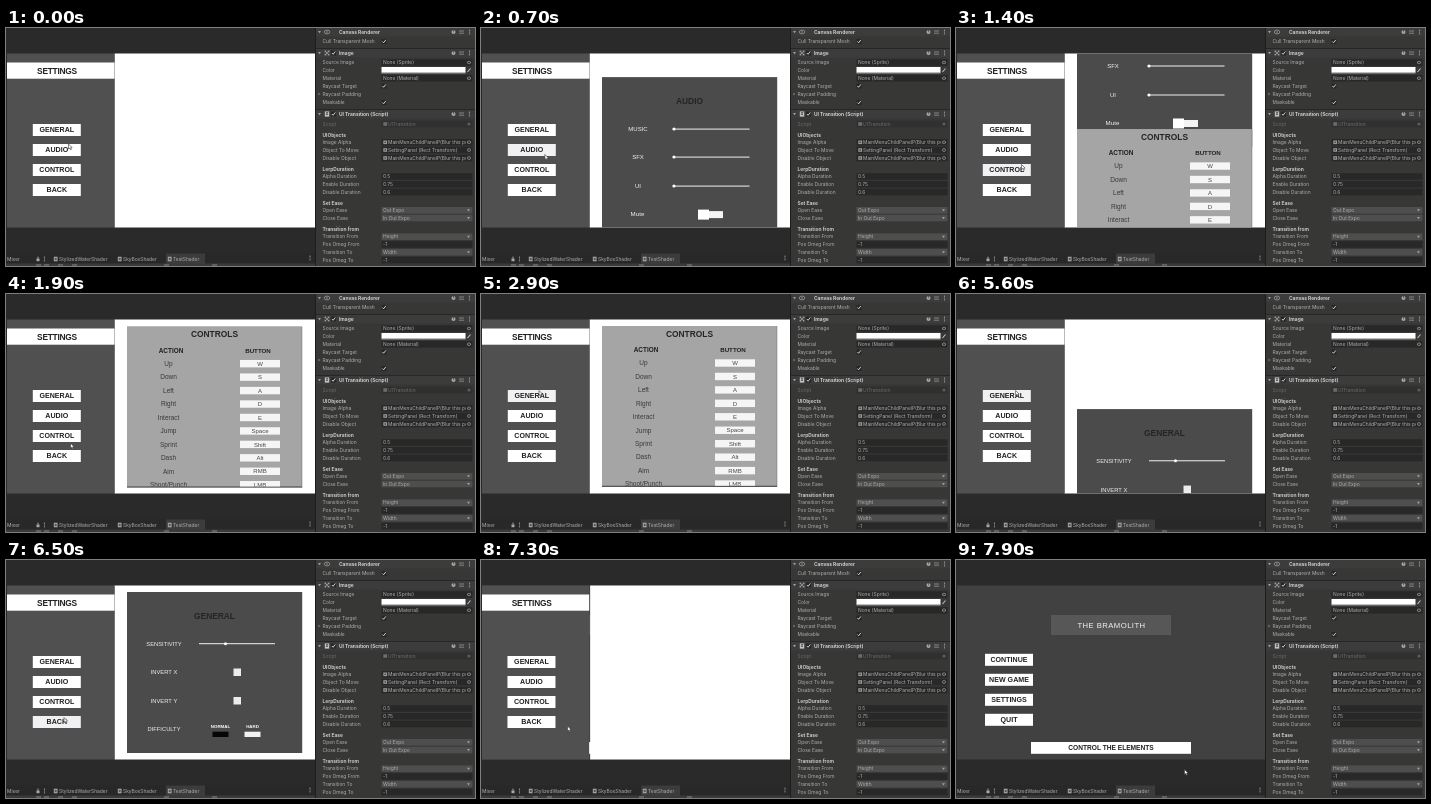
These frames come from a looping animation (469 px wide and 238 px high, 8 s). An HTML page with a canvas:

```html
<!DOCTYPE html>
<html lang="en">
<head>
<meta charset="utf-8">
<title>Settings menu transitions</title>
<style>
html, body { margin: 0; width: 100%; height: 100%; overflow: hidden; background: #383838; }
canvas { display: block; width: 469px; height: 238px; }
</style>
</head>
<body>
<canvas id="stage"></canvas>
<script>
const W = 469, H = 238, LOOP = 8000;
const canvas = document.getElementById('stage');
const dpr = window.devicePixelRatio || 1;
canvas.width = W * dpr;
canvas.height = H * dpr;
const ctx = canvas.getContext('2d');
ctx.scale(dpr, dpr);
ctx.textBaseline = 'alphabetic';

const UI = 'Inter, Roboto, sans-serif';
const GAME = '"Liberation Sans", Arial, sans-serif';
const VIEW = { x: 1, y: 25.4, w: 308, h: 174 };
const SIDE = 107.5;

function rect(x, y, w, h, color) {
  ctx.fillStyle = color;
  ctx.fillRect(x, y, w, h);
}

function line(x1, y1, x2, y2, color, width = 1) {
  ctx.strokeStyle = color;
  ctx.lineWidth = width;
  ctx.beginPath();
  ctx.moveTo(x1, y1);
  ctx.lineTo(x2, y2);
  ctx.stroke();
}

function dot(x, y, r, color) {
  ctx.fillStyle = color;
  ctx.beginPath();
  ctx.arc(x, y, r, 0, Math.PI * 2);
  ctx.fill();
}

function poly(points, fill, stroke) {
  ctx.beginPath();
  points.forEach(([x, y]) => ctx.lineTo(x, y));
  ctx.closePath();
  ctx.fillStyle = fill;
  ctx.fill();
  if (stroke) {
    ctx.strokeStyle = stroke;
    ctx.lineWidth = 0.6;
    ctx.stroke();
  }
}

// y is the vertical middle of the capitals
function text(str, x, y, size, color, { bold = false, font = GAME, align = 'center', gap = 0 } = {}) {
  ctx.font = `${bold ? 'bold ' : ''}${size}px ${font}`;
  ctx.textAlign = align;
  ctx.letterSpacing = gap + 'px';
  ctx.fillStyle = color;
  ctx.fillText(str, x, y + size * 0.36);
}

function clipped(x, y, w, h, draw) {
  ctx.save();
  ctx.beginPath();
  ctx.rect(x, y, w, h);
  ctx.clip();
  draw();
  ctx.restore();
}

/* ---------- inspector ---------- */

function label(str, x, y, color = '#aeaeae', bold = false) {
  text(str, x, y, 4.9, color, { bold, font: UI, align: 'left' });
}

function check(x, y) {
  rect(x - 2.5, y - 2.5, 5, 5, '#262626');
  ctx.lineJoin = 'round';
  line(x - 1.6, y, x - 0.4, y + 1.3, '#e0e0e0', 0.9);
  line(x - 0.4, y + 1.3, x + 1.8, y - 1.6, '#e0e0e0', 0.9);
}

function fold(x, y) {
  poly([[x - 1.5, y - 1], [x + 1.5, y - 1], [x, y + 1.3]], '#a0a0a0');
}

function eyeIcon(x, y) {
  ctx.strokeStyle = '#9a9a9a';
  ctx.lineWidth = 0.8;
  ctx.beginPath();
  ctx.ellipse(x, y, 2.8, 1.9, 0, 0, Math.PI * 2);
  ctx.stroke();
  dot(x, y, 0.8, '#9a9a9a');
}

function pictureIcon(x, y) {
  for (const dx of [-1.6, 1.6]) for (const dy of [-1.6, 1.6]) rect(x + dx - 0.8, y + dy - 0.8, 1.6, 1.6, '#a0a0a0');
  dot(x, y, 1, '#a0a0a0');
}

function scriptIcon(x, y) {
  rect(x - 2.2, y - 2.6, 4.4, 5.2, '#c4c4c4');
  text('#', x, y, 4, '#3a3a3a', { bold: true, font: UI });
}

function header(title, y, icon, toggled) {
  rect(310, y - 4.5, 159, 9, '#3c3c3c');
  line(310, y - 4.5, 469, y - 4.5, '#222', 0.8);
  fold(313.5, y);
  icon(321, y);
  if (toggled) check(327.5, y);
  label(title, 333, y, '#cfcfcf', true);
  dot(447.5, y, 2, '#a8a8a8');
  text('?', 447.5, y, 3.4, '#333', { bold: true, font: UI });
  line(453, y - 1, 458, y - 1, '#999', 0.8);
  line(453, y + 1.2, 458, y + 1.2, '#999', 0.8);
  for (let i = -1; i < 2; i++) dot(463.5, y + i * 1.8, 0.6, '#aaa');
}

function picker(y) {
  dot(463, y, 1.8, '#9a9a9a');
  dot(463, y, 1.1, '#303030');
}

function field(str, y, kind) {
  rect(375.5, y - 3.3, 91, 6.6, kind === 'menu' ? '#4e4e4e' : '#282828');
  if (kind === 'object') {
    rect(377.3, y - 1.8, 3.8, 3.6, '#999');
    rect(378.5, y - 0.6, 1.4, 1.2, '#333');
    clipped(375, y - 4, 85, 8, () => label(str, 382, y));
  } else {
    label(str, 377, y);
  }
  if (kind === 'menu') fold(462.5, y);
  if (kind === 'object' || kind === 'pick') picker(y);
}

function inspector() {
  rect(309, 0, 160, H, '#373736');
  rect(309, 0, 1, H, '#1d1d1d');

  header('Canvas Renderer', 4, eyeIcon, false);
  label('Cull Transparent Mesh', 316.5, 13.5);
  check(378, 13.5);

  header('Image', 25, pictureIcon, true);
  label('Source Image', 316.5, 34.5);
  field('None (Sprite)', 34.5, 'pick');
  label('Color', 316.5, 42.3);
  rect(375.5, 39, 84, 5.5, '#fff');
  rect(375.5, 44.5, 84, 0.8, '#ddd');
  line(461.5, 44, 464.5, 40.5, '#c0c0c0', 1.1);
  label('Material', 316.5, 50.3);
  field('None (Material)', 50.3, 'pick');
  label('Raycast Target', 316.5, 58);
  check(378, 58);
  poly([[312.4, 64.6], [314.4, 66], [312.4, 67.4]], '#777');
  label('Raycast Padding', 316.5, 66);
  label('Maskable', 316.5, 74.5);
  check(378, 74.5);

  header('UI Transition (Script)', 86, scriptIcon, true);
  label('Script', 316.5, 96, '#6c6c6c');
  rect(375.5, 92.7, 91, 6.6, '#303030');
  rect(377.3, 94.2, 3.8, 3.6, '#6c6c6c');
  label('UITransition', 382, 96, '#6c6c6c');
  dot(463, 96, 1.6, '#5c5c5c');

  const rows = [
    ['UIObjects', 107],
    ['Image Alpha', 114.3, 'MainMenuChildPanelP(Blur this pc', 'object'],
    ['Object To Move', 122, 'SettingPanel (Rect Transform)', 'object'],
    ['Disable Object', 130, 'MainMenuChildPanelP(Blur this pc', 'object'],
    ['LerpDuration', 141],
    ['Alpha Duration', 148.5, '0.5'],
    ['Enable Duration', 156.3, '0.75'],
    ['Disable Duration', 164, '0.6'],
    ['Set Ease', 175],
    ['Open Ease', 182.3, 'Out Expo', 'menu'],
    ['Close Ease', 190, 'In Out Expo', 'menu'],
    ['Transition from', 201.3],
    ['Transition From', 208.7, 'Height', 'menu'],
    ['Pos Omeg From', 216.5, '-1'],
    ['Transition To', 224.2, 'Width', 'menu'],
    ['Pos Omeg To', 232, '-1']
  ];
  for (const [name, y, value, kind] of rows) {
    label(name, 316.5, y, value ? '#aeaeae' : '#cacaca', !value);
    if (value) field(value, y, kind);
  }
}

function tabs() {
  rect(0, 225, 309, 13, '#282828');
  rect(160, 225.5, 39, 10.5, '#3c3c3c');
  label('Mixer', 1, 231);
  [['StylizedWaterShader', 53], ['SkyBoxShader', 117], ['TestShader', 167]].forEach(([name, x]) => {
    rect(x - 5.2, 228.7, 3.8, 4.6, '#a0a0a0');
    rect(x - 4.2, 230, 1.8, 2, '#555');
    label(name, x, 231);
  });
  rect(30.5, 230.4, 3, 2.8, '#a8a8a8');
  rect(31.2, 228.6, 1.6, 2, '#777');
  for (let i = -1; i < 2; i++) {
    dot(38.5, 231 + i * 1.8, 0.6, '#aaa');
    dot(304, 230 + i * 1.8, 0.6, '#aaa');
  }
  rect(0, 235.5, 309, 2.5, '#3a3a3a');
  for (const x of [30, 38, 52, 66, 158, 206]) rect(x, 236, 5, 2, '#606060');
}

/* ---------- game panels, drawn at their resting place ---------- */

function slider(y, knob) {
  line(191.5, y, 268.5, y, '#f0f0f0', 1);
  dot(knob, y, 1.5, '#fff');
}

function audioPanel() {
  rect(121, 32, 175.2, 161, '#4b4b4b');
  text('AUDIO', 208.5, 55.5, 8.4, '#242424', { bold: true });
  [['MUSIC', 84], ['SFX', 112], ['UI', 141]].forEach(([name, y]) => {
    text(name, 157, y, 6, '#f4f4f4');
    slider(y, 193);
  });
  text('Mute', 156.5, 169, 6.2, '#f4f4f4');
  rect(217, 164.5, 11, 10, '#fff');
  rect(228, 166, 14, 7, '#f4f4f4');
}

const KEYS = [
  ['Up', 'W'], ['Down', 'S'], ['Left', 'A'], ['Right', 'D'], ['Interact', 'E'],
  ['Jump', 'Space'], ['Sprint', 'Shift'], ['Dash', 'Alt'], ['Aim', 'RMB'], ['Shoot/Punch', 'LMB']
];

function controlsPanel() {
  rect(121, 32, 175.2, 161, '#565656');
  rect(121, 32, 174.8, 159.7, '#a5a5a5');
  text('CONTROLS', 208.5, 39.6, 8.4, '#262626', { bold: true });
  text('ACTION', 165, 55.8, 6.4, '#202020', { bold: true });
  text('BUTTON', 252, 55.8, 6.2, '#202020', { bold: true });
  clipped(121, 60, 175, 131.7, () => KEYS.forEach(([action, key], i) => {
    const y = 69 + i * 13.45;
    text(action, 162.5, y, 6.5, '#3a3a3a');
    rect(234, y - 3.7, 40, 7.4, '#f5f5f5');
    text(key, 254, y, 6, '#444');
  }));
}

function generalPanel() {
  rect(121, 32, 175.2, 161, '#4b4b4b');
  text('GENERAL', 208.5, 55.5, 8.4, '#242424', { bold: true });
  const names = ['SENSITIVITY', 'INVERT X', 'INVERT Y', 'DIFFICULTY'];
  names.forEach((name, i) => text(name, 158, 84 + i * 28.4, 5.8, '#f0f0f0'));
  line(193, 83.7, 269, 83.7, '#f0f0f0', 1);
  dot(219.5, 83.7, 1.5, '#fff');
  rect(227.5, 108.5, 7.5, 7.5, '#ececec');
  rect(227.5, 137, 7.5, 7.5, '#ececec');
  text('NORMAL', 214.5, 166.5, 4.4, '#fff', { bold: true });
  text('HARD', 246.5, 166.5, 4.4, '#fff', { bold: true });
  rect(206.5, 171.7, 16, 5.3, '#060606');
  rect(238.5, 171.7, 16, 5.3, '#f2f2f2');
}

function buttons(names, x, y, cursor) {
  names.forEach((name, i) => {
    const top = y + i * 20;
    const over = cursor && cursor.x > x && cursor.x < x + 48 && cursor.y > top && cursor.y < top + 12;
    rect(x, top, 48, 12, over ? '#f1f0f2' : '#fff');
    text(name, x + 24, top + 5.9, 7.1, '#222', { bold: true });
  });
}

function sidebar(cursor) {
  rect(1, 25, SIDE, 175, '#515051');
  rect(1, 34.5, SIDE, 16.2, '#fff');
  text('SETTINGS', 51, 43, 8.4, '#222', { bold: true, gap: -0.25 });
  buttons(['GENERAL', 'AUDIO', 'CONTROL', 'BACK'], 26.8, 96, cursor);
}

function mainMenu() {
  rect(1, 25, 308, 175, '#414141');
  rect(95, 55, 120, 20, '#575757');
  text('THE BRAMOLITH', 155.5, 65, 7.7, '#f2f2f2', { gap: 0.45 });
  buttons(['CONTINUE', 'NEW GAME', 'SETTINGS', 'QUIT'], 29, 93.8);
  rect(75, 182, 160, 11.8, '#fff');
  text('CONTROL THE ELEMENTS', 155, 188, 6.6, '#222', { bold: true });
}

/* ---------- motion ---------- */

const clamp = v => Math.min(1, Math.max(0, v));
const outExpo = p => p >= 1 ? 1 : 1 - 2 ** (-10 * p);
const inOutExpo = p => p <= 0 ? 0 : p >= 1 ? 1
  : p < 0.5 ? 2 ** (20 * p - 10) / 2 : 1 - 2 ** (10 - 20 * p) / 2;
const opening = (t, start) => outExpo(clamp((t - start) / 750));
const closing = (t, start) => inOutExpo(clamp((t - start) / 600));

const PANELS = [
  { draw: audioPanel, open: 450, close: 1108 },
  { draw: controlsPanel, open: 1301, close: 3990 },
  { draw: generalPanel, open: 5521, close: 6870 }
];
const LEAVE = 7220;

// time, x, y
const PATH = [
  [0, 62.5, 116], [300, 62.5, 116], [1050, 65, 135], [1400, 65.5, 136.5],
  [2200, 64, 155], [2500, 64, 155], [2900, 58, 96.5], [3400, 58, 96.5],
  [3950, 61, 136.5], [4400, 61, 136.5], [5200, 59.6, 96.5], [5700, 59.6, 96.5],
  [6500, 58, 157.5], [7100, 60, 158], [7900, 228.5, 209.5], [8000, 228.5, 209.5]
];

function cursorAt(t) {
  const i = Math.max(1, PATH.findIndex(p => p[0] > t));
  const [t0, x0, y0] = PATH[i - 1], [t1, x1, y1] = PATH[i];
  const p = clamp((t - t0) / (t1 - t0)), e = p * p * (3 - 2 * p);
  return { x: x0 + (x1 - x0) * e, y: y0 + (y1 - y0) * e };
}

function arrow({ x, y }) {
  poly([[0, 0], [0, 5], [1.2, 4], [2, 5.8], [2.9, 5.4], [2.1, 3.7], [3.6, 3.6]]
    .map(([dx, dy]) => [x + dx, y + dy]), '#fff', '#333');
}

function render(t) {
  const cursor = cursorAt(t);
  rect(0, 0, 309, 225, '#2a2a2a');
  clipped(VIEW.x, VIEW.y, VIEW.w, VIEW.h, () => {
    const out = closing(t, LEAVE);
    if (out > 0) mainMenu();
    if (out < 1) {
      const left = 1 + SIDE;
      rect(left + (309 - left) * out, 25, 309 - left, 175, '#fff');
      for (const { draw, open, close } of PANELS) {
        if (t < open || t > close + 600) continue;
        ctx.save();
        ctx.translate(0, VIEW.h * (1 - opening(t, open) - closing(t, close)));
        draw();
        ctx.restore();
      }
      ctx.save();
      ctx.translate(-SIDE * out, 0);
      sidebar(cursor);
      ctx.restore();
    }
  });
  arrow(cursor);
}

function tick(now) {
  render(now % LOOP);
  requestAnimationFrame(tick);
}

inspector();
tabs();
render(0);
requestAnimationFrame(tick);
</script>
</body>
</html>
```
